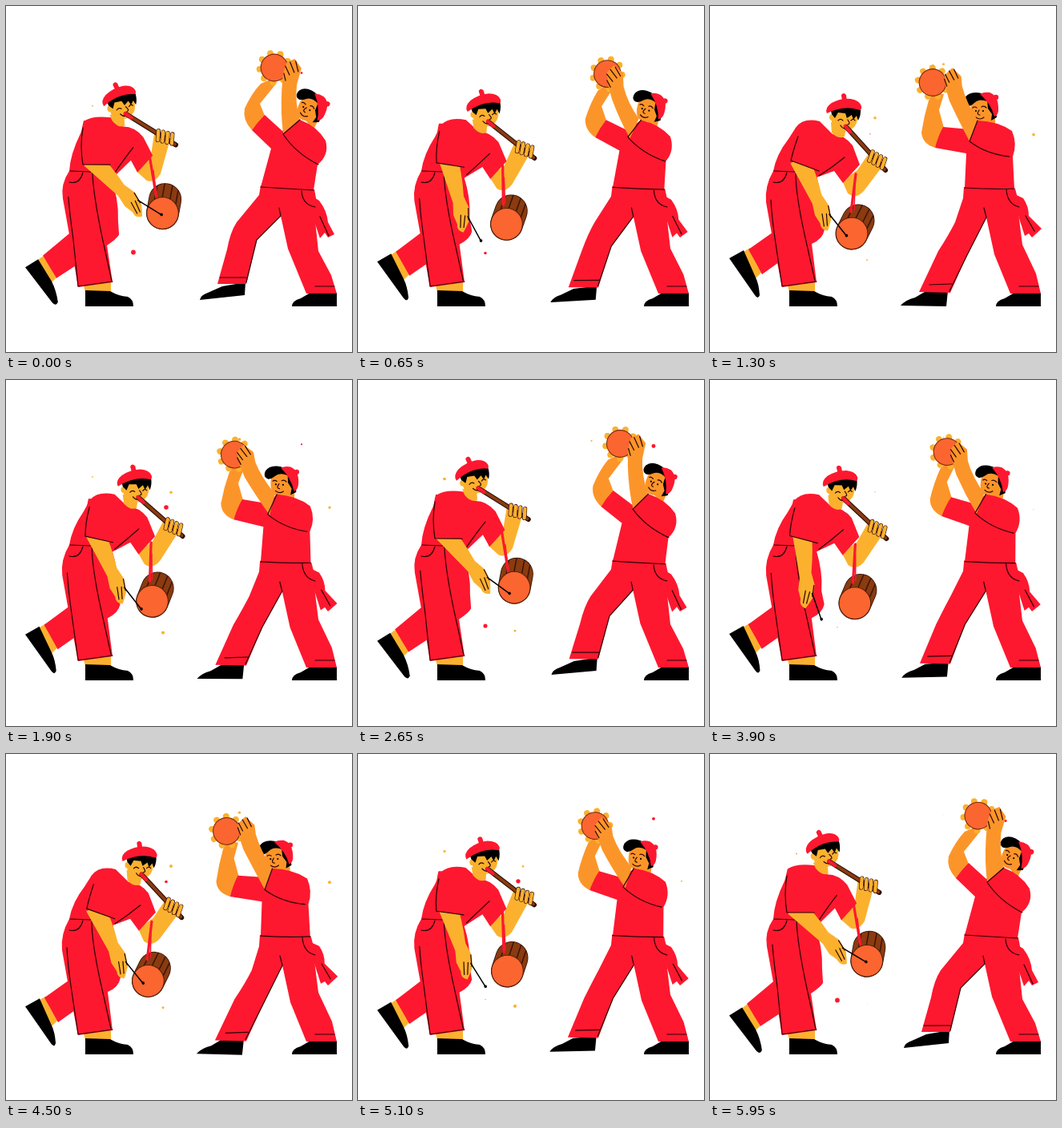
These frames come from a looping animation (432x432 px, 6000 ms). An HTML page with a canvas:

```html
<!DOCTYPE html>
<html lang="en">
<head>
<meta charset="utf-8">
<title>Two musicians</title>
<style>
html, body { margin: 0; width: 100%; height: 100%; overflow: hidden; background: #fff; }
canvas { display: block; width: 432px; height: 432px; }
</style>
</head>
<body>
<canvas id="stage" width="432" height="432"></canvas>
<script>
const ctx = document.getElementById('stage').getContext('2d');
const RED = '#fd182f', GOLD = '#fbb12e', TAN = '#fc9529', INK = '#000',
      LINE = '#2a0306', WOOD = '#8a3b10', DISC = '#fb6530';
const TAU = Math.PI * 2, STEP = 50, LOOP = 6000, CYCLE = 3000, BEAT = 1500;

const lerp = (a, b, k) => a + (b - a) * k;
const wave = (t, lead, period = CYCLE) => (1 - Math.cos(TAU * (t + lead) / period)) / 2;

// Blend two paths that share the same commands.
function blend(a, b, k) {
  const nums = b.match(/-?[\d.]+/g);
  let i = 0;
  return new Path2D(a.replace(/-?[\d.]+/g, n => lerp(+n, +nums[i++], k).toFixed(2)));
}

function fill(color, path) {
  ctx.fillStyle = color;
  ctx.fill(typeof path === 'string' ? new Path2D(path) : path);
}

function stroke(path, width = 1.2, color = LINE) {
  ctx.strokeStyle = color;
  ctx.lineWidth = width;
  ctx.stroke(typeof path === 'string' ? new Path2D(path) : path);
}

function dot(x, y, r, color) {
  ctx.fillStyle = color;
  ctx.beginPath();
  ctx.arc(x, y, r, 0, TAU);
  ctx.fill();
}

function within(x, y, deg, draw) {
  ctx.save();
  ctx.translate(x, y);
  ctx.rotate(deg * Math.PI / 180);
  draw();
  ctx.restore();
}

// x, y, radius, colour, time of largest size, half of visible span, drift per second
const specks = [
  [108, 122.8, 2, GOLD, 2450, 680, 3.5],
  [159, 307.5, 2.9, RED, 3000, 950, 1.5],
  [206, 140, 2, GOLD, 1600, 800, 0.5],
  [200, 159, 2.8, RED, 1950, 700, -1],
  [196, 315, 2.1, GOLD, 2050, 950, -3],
  [291.5, 74, 1.8, GOLD, 1850, 1160, 2.5],
  [369, 82, 2.6, RED, 2480, 720, 3],
  [404, 160, 2, GOLD, 1550, 720, -2.5]
];

function drawSpecks(t) {
  for (const [x, y, r, color, peak, half, drift] of specks) {
    let d = (t - peak) % CYCLE;
    if (d < -CYCLE / 2) d += CYCLE;
    if (d > CYCLE / 2) d -= CYCLE;
    if (Math.abs(d) < half)
      dot(x, y + drift * d / 1000, r * Math.pow(Math.cos(Math.PI / 2 * d / half), 0.7), color);
  }
}

function piperHead() {
  dot(-15, 1, 4, GOLD);
  fill(GOLD, 'M-16 -8L16 -10Q18 4 13 12Q6 20 -3 18L-16 13Z');
  fill(INK, 'M-17 -8Q0 -16 20 -11Q21 -2 17 5L15 -1L11 4L9 -2L3 2L1 -4L-8 -5L-12 2L-16 -3Z');
  fill(RED, 'M-22 -4Q-25 -11 -16 -17Q-5 -23 8 -22Q19 -20 21 -13Q22 -9 19 -8Q0 -15 -22 -4Z');
  fill(RED, 'M-4 -27Q-1 -31 2 -27L3 -20L-3 -20Z');
  stroke('M-8 5Q-5 2 -2 5M8 5Q11 2 13 5M4 4Q8 10 4 10M-5 11Q-2 16 3 15');
  stroke('M2 13L51 67', 6, '#2a0d04');
  stroke('M3 14L50 66', 3.8, WOOD);
  stroke('M1 12L7 19', 4.6, RED);
  for (let i = 0; i < 4; i++) {
    const x = 35 + i * 5.2, y = 44 + i * 3;
    const finger = `M${x} ${y}L${x - 4} ${y + 11}`;
    stroke(finger, 5.4, LINE);
    stroke(finger, 4.2, GOLD);
  }
}

function drum(s) {
  const fx = lerp(196, 177, s), fy = lerp(258, 284, s);
  const bx = lerp(199, 185, s), by = lerp(241, 268, s);
  const deg = Math.atan2(fy - by, fx - bx) * 180 / Math.PI;
  const len = Math.hypot(fx - bx, fy - by);
  within(bx, by, deg, () => {
    stroke(`M0 0L${len} 0`, 41, '#2a0d04');
    stroke(`M0 0L${len} 0`, 39.5, WOOD);
    for (const y of [-14, -6, 4, 13]) {
      const x = -Math.sqrt(380 - y * y);
      stroke(`M${x} ${y}L${len} ${y}`, 1.5, '#3c1405');
    }
  });
  stroke(blend('M179 186L188 238', 'M182 210L176 257', s), 3.2, RED);
  stroke(blend('M184 205L188 236', 'M181 222L180 254', s), 1.6, RED);
  dot(fx, fy, 20.3, '#53200a');
  dot(fx, fy, 19.3, DISC);
}

// Extra swing of the drumming arm: slow lift, quick strike.
function lift(t) {
  const d = t % BEAT - 850;
  const w = d < 0 ? 265 : 157;
  return 24 * Math.exp(-d * d / (2 * w * w));
}

function piper(t) {
  const sway = wave(t, 150);
  const s = Math.pow(sway, 0.75);     // torso leads
  const turn = Math.pow(sway, 1.5);   // head and sleeve follow
  const mix = (a, b) => blend(a, b, s);

  fill(GOLD, mix('M38 319L50 310L66 337L57 345Z', 'M40 308L50 302L66 331L57 340Z'));
  fill(INK, mix('M40 317L24 327L58 371Q63 376 65 370Q63 356 57 344Z',
                'M42 305L24 315L56 361Q60 367 62 361Q61 347 57 339Z'));
  fill(RED, mix('M84 280L46 312Q54 326 63 340L86 325L100 280Z',
                'M82 280L48 304Q56 318 65 335L86 320L100 280Z'));
  fill(GOLD, 'M96 346L131 342L131 357L99 357Z');
  fill(INK, 'M99 355L130 356Q140 362 152 363Q159 366 159 375L99 375Z');

  fill(GOLD, mix('M162 205L176 217Q186 220 193 208L202 172L184 158L180 190Z',
                 'M165 218L172 234Q182 242 192 231L220 194L201 180L184 205Z'));
  fill(RED, mix('M79 206Q68 222 71 240L80 290L90 351L133 345L126 299Q138 291 141 286L140 268Q141 240 130 212L105 206Z',
                'M79 206Q68 225 70 245L78 290L90 351L133 345L127 297Q141 291 143 279L139 262Q141 240 133 212L105 206Z'));
  fill(RED, mix('M97 143Q108 136 131 139L146 150Q160 150 171 163L183 186L164 207L156 192L131 217L105 207L79 206Q80 185 93 158Z',
                'M107 152Q116 139 137 144L153 160Q168 161 178 174L187 198L166 221L155 206L133 214L105 209L79 206Q83 185 98 166Z'));
  stroke(mix('M78 238Q80 262 84 290L90 350L133 344', 'M76 242Q77 262 81 290L90 350L133 344'));
  stroke(mix('M108 208Q109 235 120 288L132 343', 'M107 209Q107 235 118 285L131 343'));
  stroke('M80 206L106 207M79 220Q92 223 96 208');
  stroke(mix('M158 176Q148 189 135 209', 'M168 189Q152 202 136 212'));

  fill(GOLD, mix('M128 135L131 142Q139 152 147 149L146 138Z',
                 'M151 145L152 158Q160 167 168 163L170 153Z'));
  within(lerp(143, 168, s), lerp(122, 138, s), lerp(-16, 0, turn), piperHead);
  drum(sway);

  within(lerp(115, 117, turn), lerp(199, 202, turn), 45 + 21 * s + lift(t), () => {
    fill(GOLD, 'M-12 -11Q10 -12 40 -7L56 -10L72 -6Q80 0 84 4Q80 12 72 9L60 11L45 8L-12 13Z');
    stroke('M64 -3L78 2M62 2L77 6M56 -9L70 -6');
    stroke('M66 -6L100 -15', 1.5, INK);
    dot(99, -15, 1.8, INK);
  });
  fill(RED, blend('M97 143Q92 160 95 198L130 198L142 172L125 145Z',
                  'M107 152Q103 170 101 193L136 206L150 182L128 150Z', turn));
  stroke(blend('M96 152Q92 175 96 198L130 198', 'M110 163Q104 180 101 193L136 206', turn));
}

function dancerHead() {
  fill(TAN, 'M-16 -6Q-18 8 -13 15Q-7 21 1 18L14 24L14 4L8 -12L-8 -12Z');
  fill(INK, 'M4 -9L15 3L16 12L9 16L10 8L5 1Z');
  fill(INK, 'M-20 -2Q-27 -4 -24 -12Q-20 -19 -10 -19Q0 -19 7 -12L4 -8Q-6 -12 -12 -6Q-16 -2 -20 -2Z');
  fill(RED, 'M-5 -17Q0 -20 7 -19Q19 -15 18 4Q17 10 13 11Q9 -5 -5 -17Z');
  dot(15, -13, 3.2, RED);
  dot(-10, 4, 1.1, INK);
  dot(-1, 4, 1.1, INK);
  stroke('M-14 0Q-12 -2 -9 0M-3 -1Q0 -3 3 0M-6 3Q-10 9 -5 9M-10 12Q-5 16 0 12');
}

function tambourine(k) {
  within(lerp(335, 278, k), lerp(77, 95.5, k), -25 * k, () => {
    for (let i = 0; i < 9; i++) {
      const a = i * TAU / 9 + 0.25;
      dot(18.5 * Math.cos(a), 18.5 * Math.sin(a), 3.9, GOLD);
    }
    dot(0, 0, 17.4, '#7a2b0c');
    dot(0, 0, 16.3, DISC);
  });
}

function dancer(t) {
  const k = wave(t, 0) / 0.957;
  const tap = wave(t, 130, BEAT);
  const mix = (a, b) => blend(a, b, k);

  fill(INK, mix('M242 367Q243 361 252 358L270 350L299 345L298 361Z',
                'M238 374Q244 367 256 364L268 357L297 356L295 375Z'));
  fill(INK, 'M357 375Q357 368 368 365L380 358L413 358L413 375Z');
  fill(TAN, mix('M307 155Q295 142 298 128Q306 110 318 97L334 90L338 96L317 122L323 137Z',
                'M281 177Q265 172 264 158Q267 138 273 118L278 108L292 110L286 130L292 152Z'));
  tambourine(k);
  within(lerp(382, 342, k), 127, lerp(27, 0, k), dancerHead);

  fill(RED, mix('M380 236L391 243Q401 256 402 270L410 285L402 289L398 283L392 290L386 272Z',
                'M378 234L391 240Q398 250 398 262L414 278L402 289L398 284L393 287L385 262Z'));
  fill(RED, mix('M318 224L316 236L288 270Q280 282 276 304L264 347L300 347L313 292L343 262L352 303L375 359L413 359L406 336L390 306L386 268Q390 250 385 229Z',
                'M317 226L316 240L306 270Q298 286 285 306L261 357L300 358L321 311L345 264L355 310L375 359L413 359L407 334L390 298L385 258Q386 245 381 228Z'));
  fill(RED, mix('M318 226L331 178L307 155Q314 145 323 136L345 156L367 142Q388 150 399 168Q404 186 389 198L384 230Z',
                'M318 227L320 184L281 177Q285 162 291 151L324 154L334 143Q360 144 377 156Q384 172 378 188L380 228Z'));
  stroke(mix('M318 226Q350 228 384 230', 'M318 227Q350 229 380 228'));
  stroke(mix('M300 345L313 292L343 262L341 252', 'M299 356L321 311L345 264L342 252'));
  stroke(mix('M267 339L301 339', 'M274 348L302 347'));
  stroke('M386 350L410 350');
  stroke(mix('M369 231Q370 248 386 251', 'M370 229Q371 247 386 251'));
  stroke(mix('M392 263L403 287', 'M394 262L405 281'));

  // The playing arm swings about its sleeve to strike the skin.
  const px = lerp(356, 329, k), py = lerp(151, 156, k);
  within(px, py, -13 * tap, () => {
    ctx.translate(-px, -py);
    fill(TAN, mix('M346 160Q343 135 345 105L347 84L352 70L362 66L370 78L364 98Q361 120 367 142Z',
                  'M324 169Q310 142 299 118L295 104L293 86L303 77L314 88L315 100Q320 120 334 143Z'));
    stroke(mix('M350 75L355 86M356 70L361 83M363 69L366 82M348 84L350 93',
               'M294 85L299 95M299 81L305 92M305 79L310 90M293 91L296 100'));
  });
  stroke(mix('M367 142L346 160Q362 184 390 198', 'M334 143L324 169Q345 185 374 188'));
}

function frame(now) {
  const t = Math.floor(Math.max(0, now - start) % LOOP / STEP) * STEP;
  ctx.fillStyle = '#fff';
  ctx.fillRect(0, 0, 432, 432);
  ctx.lineCap = 'round';
  ctx.lineJoin = 'round';
  drawSpecks(t);
  piper(t);
  dancer(t);
  requestAnimationFrame(frame);
}

const start = performance.now();
frame(start);
</script>
</body>
</html>
```
